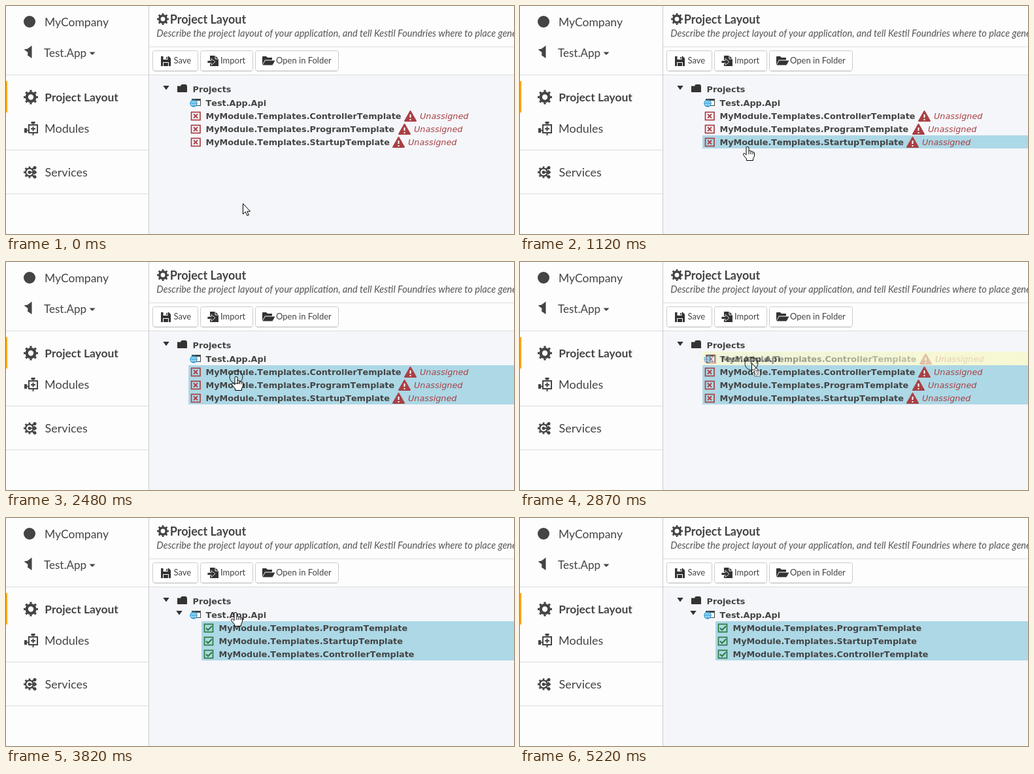
An HTML page for the animation above (5.81 s loop, 777 px wide and 349 px high).

```html
<!DOCTYPE html>
<html lang="en">
<head>
<meta charset="utf-8">
<title>Project Layout</title>
<style>
html, body { margin: 0; height: 100%; overflow: hidden; }
svg { display: block; width: 100%; height: 100%; }
text { font: 18px Lato, sans-serif; fill: #444; white-space: pre; }
.title { font-weight: 700; font-size: 17.4px; }
.sub { font: italic 14.55px Lato, sans-serif; fill: #555; }
.btn { font-size: 13px; }
.node { font: bold 12.8px "DejaVu Sans", sans-serif; font-kerning: none; }
.state { font: italic 12.8px "DejaVu Sans", sans-serif; font-kerning: none; fill: #a94044; }
.line { fill: none; stroke: #444; stroke-width: 2; }
.rule { stroke: #ddd; }
.box { fill: #fff; stroke: #ccc; }
.cursor { fill: #fff; stroke: #000; stroke-linejoin: round; }
</style>
</head>
<body>
<svg viewBox="0 0 777 349" fill="#444"></svg>
<script>
const svg = document.querySelector('svg');
const LOOP = 5810;

const text = (x, y, s, cls = '', extra = '') => `<text x="${x}" y="${y}" class="${cls}" ${extra}>${s}</text>`;
const path = (d, extra = '') => `<path d="${d}" ${extra}/>`;
const rect = (x, y, w, h, extra = '') => `<rect x="${x}" y="${y}" width="${w}" height="${h}" ${extra}/>`;
const dot = (x, y, r) => `<circle cx="${x}" cy="${y}" r="${r}"/>`;
const group = (id, body, extra = '') => `<g id="${id}" ${extra}>${body}</g>`;

const gear = (x, y, r, rim = .4) => `<g fill="none" stroke="#444">
  <circle cx="${x}" cy="${y}" r="${r * (.78 - rim / 2)}" stroke-width="${r * rim}"/>
  <circle cx="${x}" cy="${y}" r="${r * .86}" stroke-width="${r * .28}" pathLength="16"
    stroke-dasharray=".9 1.1" stroke-dashoffset=".45"/></g>`;

const button = (x, w, label, tx, id) =>
  rect(x + .5, 68.5, w, 31, `id="${id}" class="box" rx="3"`) +
  path(`M${x + 3} 99.5h${w - 5}`, 'stroke="#b3b3b3"') +
  text(tx, 88, label, 'btn');

const chevron = (x, y) => path(`M${x + .3} ${y}h9.400l-4.700 6.500z`, 'fill="#333"');

const pending = (y, label, end) =>
  rect(283.5, y - 5.5, 13.5, 12, 'fill="none" stroke="#a94044" stroke-width="1.7"') +
  path(`M287 ${y - 2.5}l6 6m0-6l-6 6`, 'stroke="#a94044" stroke-width="1.8"') +
  text(305.5, y + 5, label, 'node') +
  path(`M${end + 13.5} ${y - 7}l8.500 15h-17z`, 'fill="#a94044" stroke="#a94044" stroke-width="2" stroke-linejoin="round"') +
  path(`M${end + 13.5} ${y - 2}v5m0 2v2`, 'stroke="#fff" stroke-width="2"') +
  text(end + 28, y + 5, 'Unassigned', 'state');

const assigned = (y, label) =>
  rect(303.5, y - 5.5, 13, 12, 'fill="none" stroke="#2c7a3f" stroke-width="1.7"') +
  path(`M306 ${y + .5}l3 3 6-6`, 'fill="none" stroke="#2c7a3f" stroke-width="2"') +
  text(325.5, y + 5, label, 'node');

const NAME = kind => `MyModule.Templates.${kind}Template`;
const blue = (id, x, y, h) => rect(x, y, 777 - x, h, `id="${id}" fill="#add8e6"`);

const sidebar = rect(0, 0, 218, 349, 'fill="#fdfdfd"') +
  path('M0 105.5h218M0 220.5h218M0 287.5h218', 'class="rule"') +
  path('M218.5 0v349', 'stroke="#ccc"') +
  rect(0, 115, 2, 48, 'fill="orange"') +
  dot(36, 24, 9) +
  text(59, 30.5, 'MyCompany', '', 'style="font-size:17.5px"') +
  path('M39.5 60.5V80L33 75.5 33.5 71 27.5 66.5 33 65.5z') +
  text(58, 77.5, 'Test.App', '', 'style="font-size:17px"') +
  path('M127.5 70.5h9l-4.500 4.500z') +
  gear(38, 139.5, 11) + text(59.3, 146, 'Project Layout', 'title') +
  rect(35, 182, 13, 12, 'class="line"') +
  path('M41.5 184.5v7M38 188h7M41.5 177v5M41.5 194v4M28 190.5h7', 'class="line"') +
  path('M28 187h4v7h-4zM38.5 177h6v3h-6z') +
  text(59, 194, 'Modules') +
  gear(36, 254.5, 9, .25) + dot(36, 254.5, 2.5) +
  path('M36 254.5h10m-3-3l3 3-3 3', 'class="line"') +
  dot(44, 247.5, 2.5) + dot(44, 261.5, 2.5) +
  text(59.6, 261, 'Services');

const header = rect(219, 0, 558, 106, 'fill="#fdfdfd"') +
  rect(219, 106, 558, 243, 'fill="#f5f6fa"') +
  path('M219 62.5h558M219 105.5h558', 'class="rule"') +
  gear(240, 20, 9) +
  text(250.8, 27, 'Project Layout', 'title', 'style="font-size:18px"') +
  text(230.3, 47, 'Describe the project layout of your application, and tell Kestil Foundries where to place generated output', 'sub');

const toolbar = button(224, 69, 'Save', 256.5, 'save') +
  path('M237 77h12l3 3v12h-15z', 'fill="#333"') +
  path('M240.5 77h7v5h-7zM240 86h9v6h-9z', 'fill="#fff"') +
  path('M245 78h1.500v3h-1.500zM241 87h7v5h-7z', 'fill="#333"') +
  button(297, 80, 'Import', 328, 'import') +
  path('M312 76h8l5 5v11h-13z', 'fill="#333"') +
  path('M320 76v5h5', 'fill="none" stroke="#fff"') +
  path('M308 83.5h6v-3l6 5-6 5v-3h-6z', 'fill="#333" stroke="#fff" stroke-width=".8"') +
  button(381, 127, 'Open in Folder', 413, 'open') +
  path('M392 90V78q0-1 1-1h5l2 2h7v3.500h-11z', 'fill="#333"') +
  path('M396.5 83.5h15l-4 7h-15z', 'fill="#333"');

const root = chevron(240, 122) +
  path('M262 132v-9.500h5l1.500-2.500h7l1.500 2.500v9.500z', 'fill="#333"') +
  text(285.5, 132, 'Projects', 'node');

const api = rect(284.5, 142.5, 13, 10, 'fill="#fff" stroke="#444"') +
  rect(284, 142, 14, 3) +
  '<circle cx="287" cy="149" r="5" fill="#fff" stroke="#2196d3" stroke-width="1.4"/>' +
  path('M282 149h10M287 144v10M287 144q-5 5 0 10q5-5 0-10', 'fill="none" stroke="#2196d3"') +
  text(305.5, 153, 'Test.App.Api', 'node');

const before = blue('upper', 279, 158, 40) + blue('lower', 279, 198, 20) +
  pending(168, NAME('Controller'), 605) +
  pending(188, NAME('Program'), 596) +
  pending(208, NAME('Startup'), 587);

const after = blue('done', 299, 158, 60) + chevron(260, 142) +
  assigned(168, NAME('Program')) +
  assigned(188, NAME('Startup')) +
  assigned(208, NAME('Controller'));

const arrowShape = path('M.5 .5V16.5L4.2 13 7 19 9.3 18 6.8 12.3H11.5z', 'class="cursor"');
const handShape = path('M-2 13V2Q-2 .5 0 .5T2 2V7Q2 6 3.5 6.2T5 7.5V8Q5.3 7 6.5 7.2T8 8.5V9Q8.5 8.2 9.5 8.5T10.5 10V15L8.5 18.5V21.5H-1.5V19L-6 13.5Q-7 11.5 -6 10.7T-3.5 11.5z', 'class="cursor"') +
  path('M2 7v5M5 8v4M8 9v3', 'stroke="#000"');
const dropBox = rect(4.5, 11.5, 9, 9, 'fill="#fff" fill-opacity=".6" stroke="#000" stroke-dasharray="1"');

// The dragged row fades out with distance from the pointer.
const defs = `<defs><radialGradient id="fade" gradientUnits="userSpaceOnUse" cx="352" cy="174" r="400">
  <stop stop-color="#fff" stop-opacity=".6"/><stop offset="1" stop-color="#fff" stop-opacity=".15"/>
  </radialGradient><mask id="soft" maskUnits="userSpaceOnUse" x="279" y="158" width="498" height="20">
  ${rect(279, 158, 498, 20, 'fill="url(#fade)"')}</mask></defs>`;
const ghostRow = rect(279, 158, 498, 20, 'fill="#e4eee6" fill-opacity=".7"') +
  pending(168, NAME('Controller'), 605);

svg.innerHTML = defs + header + sidebar + toolbar + root +
  rect(279, 137, 498, 21, 'id="target" fill="#fafad2"') + api +
  group('before', before) + group('after', after) +
  group('ghost', group('ghostRow', ghostRow, 'mask="url(#soft)"')) +
  group('pointer', group('arrow', arrowShape) + group('drop', dropBox) + group('hand', handShape) +
    '<circle id="ring" cy="1" r="10" fill="none" stroke="#222"/>');

// time, shape, x, y, pressed
const moves = [
  [0, 'arrow', 362, 302], [120, 'arrow', 362, 305], [430, 'arrow', 365, 292],
  [550, 'arrow', 361, 271], [700, 'arrow', 348, 228],
  [850, 'hand', 348, 215], [970, 'hand', 348, 215, 1], [1120, 'hand', 348, 215],
  [1550, 'hand', 355, 190], [1670, 'hand', 360, 171], [1820, 'hand', 362, 159],
  [1970, 'hand', 362, 167], [2220, 'hand', 361, 164], [2360, 'hand', 355, 172],
  [2480, 'hand', 352, 175, 1], [2600, 'drag', 352, 166, 1], [2750, 'drag', 353, 158, 1],
  [2870, 'drag', 354, 154.5, 1], [2990, 'drag', 354, 143, 1], [3140, 'drag', 354, 151, 1],
  [3290, 'hand', 356, 149], [3820, 'hand', 351, 144], [3970, 'hand', 310, 118],
  [4090, 'hand', 272, 93], [4240, 'hand', 269, 83], [4390, 'hand', 269, 83, 1],
  [4630, 'hand', 269, 83], [5070, 'arrow', 285, 209], [5220, 'none', 0, 0]
];

const el = id => document.getElementById(id);
const show = (id, on) => el(id).style.display = on ? '' : 'none';
const place = (id, x, y) => el(id).setAttribute('transform', `translate(${x} ${y})`);

function draw(t) {
  const [, shape, x, y, pressed] = moves.findLast(m => m[0] <= t);
  const drag = shape === 'drag';
  place('pointer', x, y);
  show('arrow', drag || shape === 'arrow');
  show('drop', drag);
  show('hand', shape === 'hand');
  show('ring', pressed);

  show('lower', t >= 1120);
  show('upper', t >= 1970);
  show('before', t < 3290);
  show('after', t >= 3290);
  show('target', t >= 2750 && t < 3290);
  show('ghost', drag);
  place('ghost', x - 352, y - 174.5);

  const hover = t >= 4240 && t < 5220;
  const active = hover && pressed;
  el('save').style.fill = active ? '#d4d4d4' : hover ? '#e6e6e6' : '#fff';
  el('save').style.stroke = active ? '#8c8c8c' : hover ? '#adadad' : '#ccc';
}

function frame() {
  draw(performance.now() % LOOP);
  requestAnimationFrame(frame);
}
frame();
</script>
</body>
</html>
```
